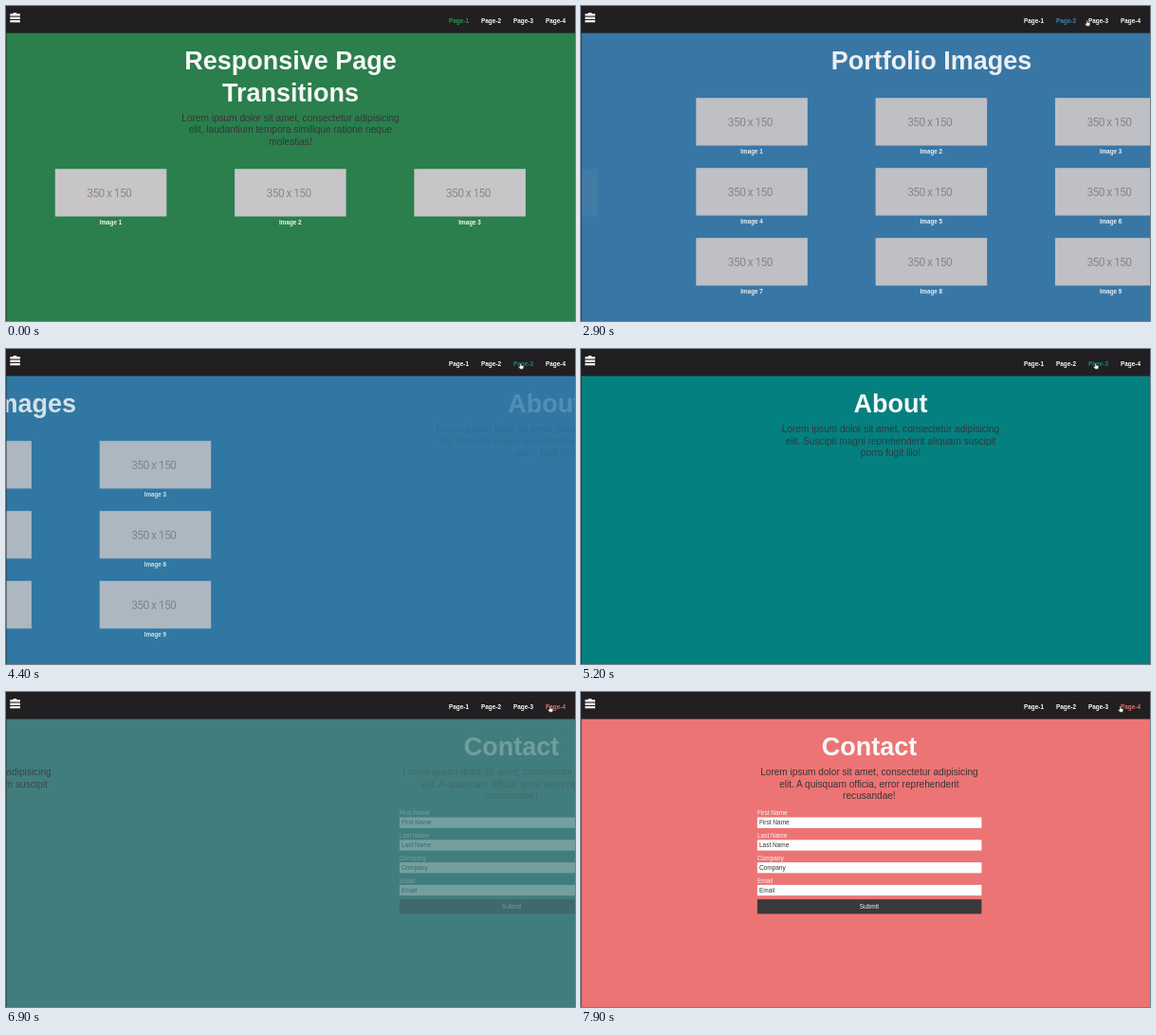
Write an HTML page that moves like this. It is 600 px wide and 333 px high and loops after 8 s.

```html
<!DOCTYPE html>
<html lang="en">
<head>
<meta charset="utf-8">
<title>Responsive Page Transitions</title>
<style>
html, body { margin: 0; width: 100%; height: 100%; overflow: hidden; background: #2a7f4b; }
svg { display: block; width: 100%; height: 100%; font-family: "Liberation Sans", Arial, sans-serif; fill: #f7f7f7; }
.title { font-weight: bold; font-size: 27px; text-anchor: middle; }
.lead { font-size: 10.1px; text-anchor: middle; fill: #383638; }
.caption { font-weight: bold; font-size: 6.3px; text-anchor: middle; }
.size { font: 12px Roboto, "Liberation Sans", sans-serif; letter-spacing: -.6px; fill: #8b898c; }
.label { font-size: 6.5px; }
.hint { font-size: 6.5px; fill: #333; }
.link { font-weight: bold; font-size: 6.4px; }
</style>
</head>
<body>
<svg id="stage" viewBox="0 0 600 333"></svg>
<script>
const LOOP = 8000, WIDTH = 600;
const stage = document.getElementById('stage');

function add(parent, tag, attrs = {}, text) {
  const el = document.createElementNS('http://www.w3.org/2000/svg', tag);
  for (const key in attrs) el.setAttribute(key, attrs[key]);
  if (text) el.textContent = text;
  parent.append(el);
  return el;
}
const rect = (parent, x, y, width, height, fill) => add(parent, 'rect', { x, y, width, height, fill });
const label = (parent, cls, x, y, text) => add(parent, 'text', { class: cls, x, y }, text);

const colors = [[42, 127, 76], [57, 118, 170], [4, 128, 128], [237, 116, 116]];
const linkColors = [[42, 150, 84], [58, 132, 180], [20, 136, 118], [224, 110, 106]];
const white = [250, 250, 250];

// Slides from page n to page n + 1
const slides = [
  { start: 1906, length: 1663 },
  { start: 3785, length: 1921 },
  { start: 6244, length: 1855 }
];

// Pointer stops: time, x, y
const stops = [
  [0, 420, 345], [900, 480, 120], [1700, 514, 20], [2300, 514, 20], [2900, 534, 18],
  [3600, 543, 18], [5300, 543, 18], [6100, 574, 18], [7100, 574, 18], [7800, 569, 18], [LOOP, 569, 18]
];

const backdrop = rect(stage, 0, 0, WIDTH, 333);
const pages = colors.map(() => add(stage, 'g'));

function intro(page, titles, lines) {
  titles.forEach((t, i) => label(page, 'title', 300, 67 + i * 33.5, t));
  const top = 55 + titles.length * 33.4;
  lines.forEach((t, i) => label(page, 'lead', 300, top + i * 12.5, t));
}

function picture(page, column, y, number) {
  const x = 51.8 + column * 189.3;
  rect(page, x, y, 117.5, 50.3, '#c8c5c8');
  label(page, 'size', x + 33.5, y + 30.2, '350 x 150');
  label(page, 'caption', x + 58.7, y + 59, 'Image ' + number);
}

const lorem = 'Lorem ipsum dolor sit amet, consectetur adipisicing';
intro(pages[0], ['Responsive Page', 'Transitions'],
  [lorem, 'elit, laudantium tempora similique ratione neque', 'molestias!']);
for (let i = 0; i < 3; i++) picture(pages[0], i, 172.2, i + 1);

intro(pages[1], ['Portfolio Images'], []);
for (let i = 0; i < 9; i++) picture(pages[1], i % 3, 97.2 + Math.floor(i / 3) * 74, i + 1);

intro(pages[2], ['About'],
  [lorem, 'elit. Suscipit magni reprehenderit aliquam suscipit', 'porro fugit illo!']);

intro(pages[3], ['Contact'],
  [lorem, 'elit. A quisquam officia, error reprehenderit', 'recusandae!']);
['First Name', 'Last Name', 'Company', 'Email'].forEach((name, i) => {
  const y = 132.5 + i * 23.8;
  label(pages[3], 'label', 182, y - 2.3, name);
  rect(pages[3], 182, y, 236.5, 11.3, '#fff');
  label(pages[3], 'hint', 184, y + 7.9, name);
});
rect(pages[3], 182, 219.2, 236.5, 15.3, '#3a393a');
add(pages[3], 'text', { class: 'label', x: 300, y: 229.2, 'text-anchor': 'middle' }, 'Submit');

// Header
rect(stage, 0, 28, .8, 305, 'rgba(30,32,34,.55)');
rect(stage, 0, 0, WIDTH, 28.6, '#211f21');
rect(stage, 7.6, 7, 3.6, 2, '#f7f7f7');
for (const y of [8.2, 11.6, 15]) rect(stage, 4.3, y, 10.6, 2.3, '#f7f7f7');
const links = colors.map((c, i) => label(stage, 'link', 467 + i * 34, 17.7, 'Page-' + (i + 1)));

// Pointer
const pointer = add(stage, 'g', { stroke: '#222', 'stroke-width': .5, fill: '#fff' });
const arrow = add(pointer, 'path', { d: 'M0 0v7l1.7-1.5 1.2 2.6 1.2-.6-1.2-2.4h2.2z', fill: '#111', stroke: '#fff' });
const hand = add(pointer, 'path', { d: 'M-1-2.6q.7-.8 1.2 0v1.8l2.2.5q.7.3.5 1.2l-.6 2.3h-3l-2-2.2q0-.9 1.7-.3z' });

const clamp = v => Math.min(1, Math.max(0, v));
const smooth = (a, b, v) => { const u = clamp((v - a) / (b - a)); return u * u * (3 - 2 * u); };
const mix = (a, b, u) => a + (b - a) * u;
const rgb = (a, b, u) => `rgb(${a.map((v, i) => Math.round(mix(v, b[i], u)))})`;

// The CSS "ease" curve
function ease(x) {
  let lo = 0, hi = 1;
  for (let i = 0; i < 24; i++) {
    const s = (lo + hi) / 2;
    if (.75 * s * (1 - s) + s ** 3 < x) lo = s; else hi = s;
  }
  const s = lo, r = 1 - s;
  return x >= 1 ? 1 : .3 * s * r * r + 3 * s * s * r + s ** 3;
}

function movePointer(t) {
  const i = stops.findIndex((s, k) => k > 0 && t <= s[0]);
  const [t0, x0, y0] = stops[i - 1], [t1, x1, y1] = stops[i];
  const u = smooth(t0, t1, t);
  const y = mix(y0, y1, u);
  pointer.setAttribute('transform', `translate(${mix(x0, x1, u)} ${y})`);
  hand.style.display = y < 29 ? '' : 'none';
  arrow.style.display = y < 29 ? 'none' : '';
}

function draw(t) {
  const current = slides.filter(s => t >= s.start).length;
  const from = Math.max(0, current - 1), to = current;
  const slide = slides[from];
  const time = current ? clamp((t - slide.start) / slide.length) : 0;
  const shift = ease(time) * WIDTH;
  const fade = smooth(.195, .667, time);
  const active = smooth(.12, .27, time);

  backdrop.setAttribute('fill', rgb(colors[from], colors[to], fade));
  pages.forEach((page, i) => {
    const shown = i === from || i === to;
    page.style.display = shown ? '' : 'none';
    if (!shown) return;
    const entering = i === to && current > 0;
    page.setAttribute('transform', `translate(${entering ? WIDTH - shift : -shift} 0)`);
    page.setAttribute('opacity', entering ? fade : 1 - fade);
  });
  links.forEach((link, i) => {
    const level = from === to ? +(i === 0) : i === to ? active : i === from ? 1 - active : 0;
    link.setAttribute('fill', rgb(white, linkColors[i], level));
  });
  movePointer(t);
}

const begin = performance.now();
function tick() {
  draw((performance.now() - begin) % LOOP);
  requestAnimationFrame(tick);
}
tick();
</script>
</body>
</html>
```
